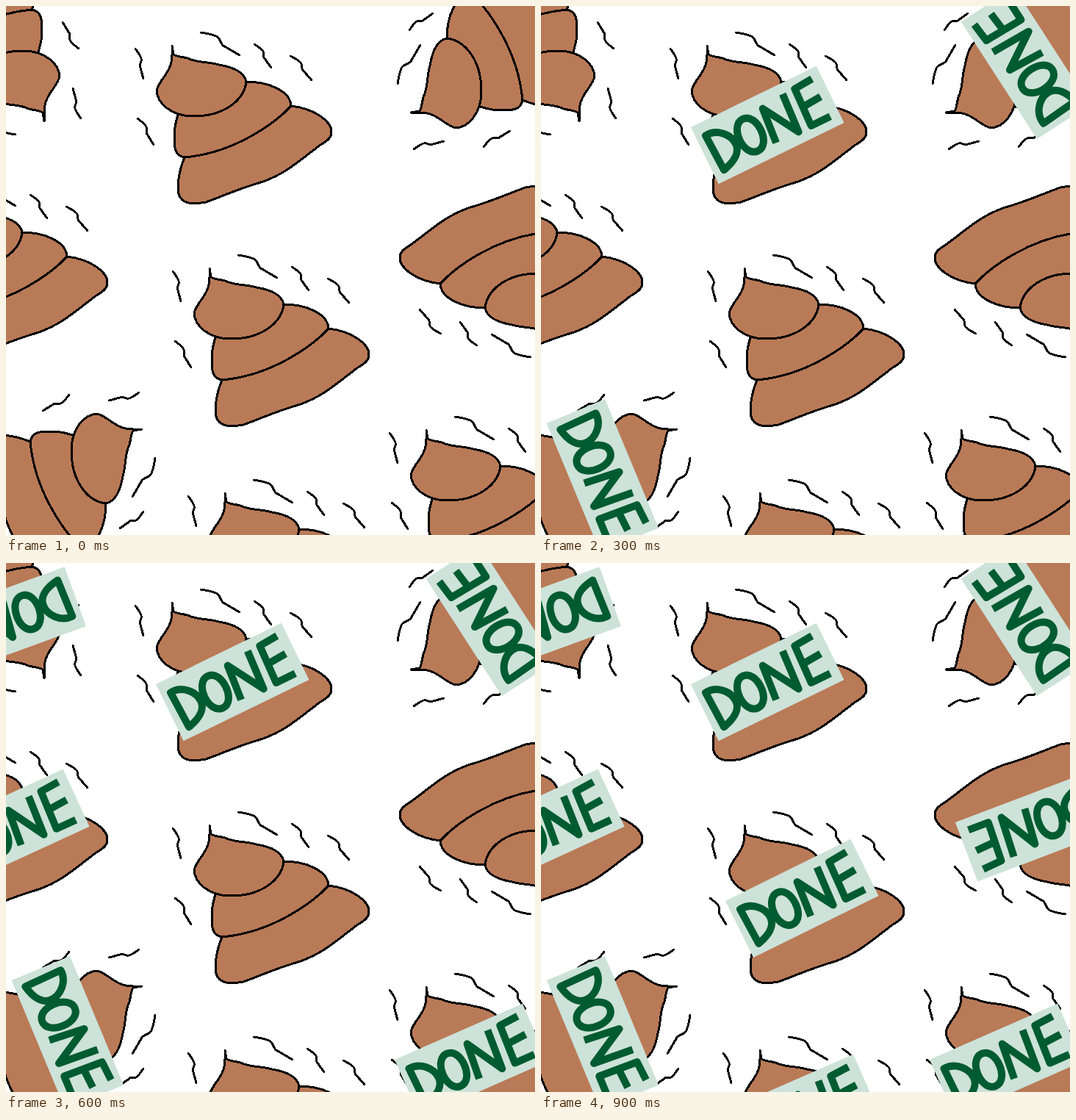
Recreate the animation shown at these times as an HTML page. Size 720 by 720 pixels, loop 1000 ms.

```html
<!DOCTYPE html>
<html lang="en">
<head>
<meta charset="utf-8">
<title>Done</title>
<style>
  html, body { margin: 0; height: 100%; overflow: hidden; background: #fff; }
  svg { display: block; width: 100%; height: 100%; }
</style>
</head>
<body>
<svg viewBox="0 0 720 720">
  <defs>
    <!-- The origin is the tip of the pile -->
    <g id="pile" transform="translate(-226 -54)" fill="#b97a57" stroke="#000" stroke-width="3" stroke-linecap="round" stroke-linejoin="round" shape-rendering="crispEdges">
      <path d="M388 136C422 140 443 158 443 171C443 183 432 185 424 192C395 214 380 228 350 239C315 249 300 257 272 267C246 272 234 266 234 248C234 234 238 218 243 206Z"/>
      <path d="M327 103C356 103 387 115 388 136C368 158 312 200 243 206C226 203 230 185 229 175C229 164 232 156 234 148Z"/>
      <path d="M226 54L228 66C232 69 240 69 247 71C262 78 272 75 290 80C314 84 325 93 327 103C324 129 296 150 255 150C224 150 206 132 205 115C210 97 226 91 226 66Z"/>
      <path id="fumes" fill="none"/>
    </g>
    <g id="label">
      <path fill="#cde2d9" d="M0 0H190V86H0Z"/>
      <path fill="none" stroke="#005c30" stroke-width="10" stroke-linejoin="round" d="M13 19L15 72C32 68 45 60 45 47C45 32 30 17 13 19Z
        M68 21C79 21 84 33 84 45C84 58 78 69 68 69C58 69 52 58 52 45C52 33 58 21 68 21Z
        M95 70L99 20L129 70L132 14
        M177 13L150 15L148 70L177 70M149 42L177 40"/>
    </g>
  </defs>
  <g id="piles"></g>
  <g id="labels"></g>
</svg>
<script>
  const $ = id => document.getElementById(id);

  // In order of labelling: tip of the pile and its quarter turns,
  // then the label's corner and tilt as seen from the pile
  const items = [
    { pile: [226, 54, 0], label: [-22, 111, -26] },
    { pile: [185, 576, 1], label: [-41, 98, -22.6] },
    { pile: [551, 145, -1], label: [-36, 124, -32.9] },
    { pile: [52, 157, 2], label: [-57, 71, -20] },
    { pile: [572, 577, 0], label: [-43, 99, -23.7] },
    { pile: [-79, 259, 0], label: [-16, 101, -24.7] },
    { pile: [753, 460, 2], label: [-19, 94, -20.8] },
    { pile: [298, 663, 0], label: [-47, 82, -23.7] },
    { pile: [277, 357, 0], label: [-26, 103, -26.3] }
  ];

  // A line with one kink to the side
  function fume(x, y, dx, dy) {
    const at = (t, side) => `${x + t * dx - side * dy} ${y + t * dy + side * dx}`;
    return `M${at(0, 0)}Q${at(0.38, -0.15)} ${at(0.43, -0.08)}L${at(0.56, 0)}L${at(1, 0)}`;
  }

  const fumes = [[176, 58, 11, 41], [265, 36, 53, 31], [338, 52, 23, 32], [387, 68, 29, 33], [179, 153, 22, 36]];
  $("fumes").setAttribute("d", fumes.map(f => fume(...f)).join(""));

  const move = (x, y, angle) => `translate(${x} ${y}) rotate(${angle})`;

  function add(id, transform) {
    const use = document.createElementNS("http://www.w3.org/2000/svg", "use");
    use.setAttribute("href", "#" + id);
    use.setAttribute("transform", transform);
    return $(id + "s").appendChild(use);
  }

  const labels = items.map(({ pile: [x, y, turns], label }) => {
    const spot = move(x, y, turns * 90);
    add("pile", spot);
    return add("label", spot + move(...label));
  });

  // One more label every 100 ms
  function draw() {
    const shown = Math.floor(performance.now() % 1000 / 100);
    labels.forEach((label, i) => label.style.display = i < shown ? "" : "none");
    requestAnimationFrame(draw);
  }
  draw();
</script>
</body>
</html>
```
